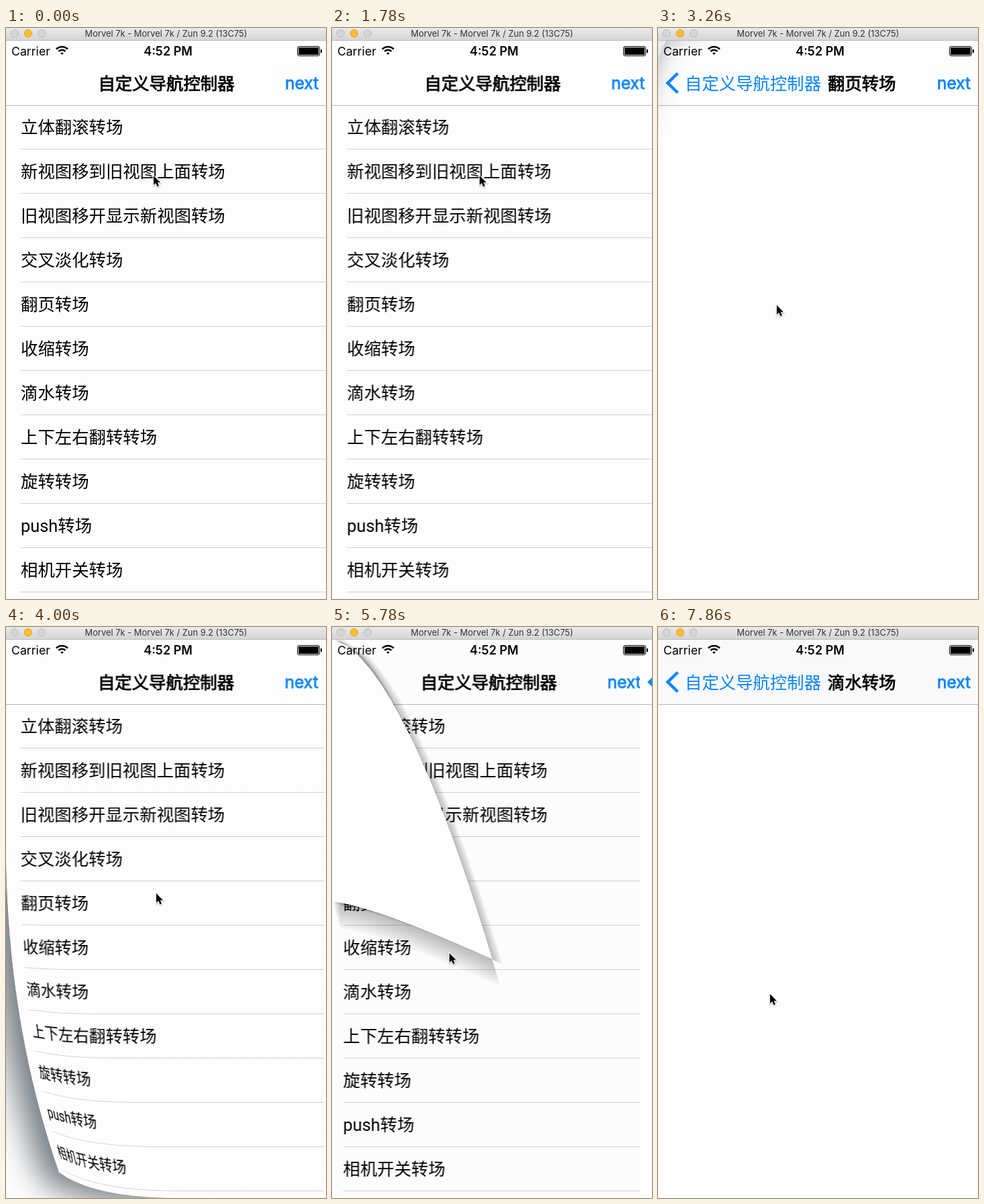
An HTML page with a canvas for the animation above (8 s loop, 477 by 851 pixels).

```html
<!DOCTYPE html>
<html lang="zh-CN">
<head>
<meta charset="utf-8">
<style>
  html, body { margin: 0; width: 100%; height: 100%; overflow: hidden; background: #fdfdfd; }
  canvas { display: block; }
</style>
</head>
<body>
<canvas id="stage" width="477" height="851"></canvas>
<script>
const W = 477, H = 851, TOP = 19;
const LOOP = 8000, TICK = LOOP / 54, DURATION = 700;
const BLUE = '#0a84ff';
const CJK = '"Noto Sans CJK SC", "Noto Sans CJK", sans-serif';
const UI = 'Inter, ' + CJK, ROW_FONT = '25.4px Roboto, ' + CJK;
const HOME = '自定义导航控制器';
const ROWS = ['立体翻滚转场', '新视图移到旧视图上面转场', '旧视图移开显示新视图转场', '交叉淡化转场',
  '翻页转场', '收缩转场', '滴水转场', '上下左右翻转转场', '旋转转场', 'push转场', '相机开关转场'];

const stage = document.getElementById('stage').getContext('2d');
const clamp = (v, lo = 0, hi = 1) => Math.min(hi, Math.max(lo, v));
const lerp = (a, b, k) => a + (b - a) * k;

function layer() {
  const c = document.createElement('canvas');
  c.width = W;
  c.height = H;
  return c.getContext('2d');
}

// CSS "ease" curve
function ease(x) {
  let lo = 0, hi = 1;
  for (let i = 0; i < 24; i++) {
    const s = (lo + hi) / 2;
    if (0.75 * s * (1 - s) + s ** 3 < x) lo = s; else hi = s;
  }
  return 0.3 * lo * (1 - lo) ** 2 + 3 * lo * lo * (1 - lo) + lo ** 3;
}

function text(g, str, x, y, font, color = '#000', align = 'left') {
  g.font = font;
  g.fillStyle = color;
  g.textAlign = align;
  g.fillText(str, x, y);
}

// Medium weight: regular glyphs with a hairline outline
function mediumText(g, str, x, y, font, color, align) {
  text(g, str, x, y, font, color, align);
  g.strokeStyle = g.fillStyle;
  g.lineWidth = 0.8;
  g.strokeText(str, x, y);
}

function rect(g, x, y, w, h, color) {
  g.fillStyle = color;
  g.fillRect(x, y, w, h);
}

function trace(g, points) {
  g.beginPath();
  points.forEach(p => g.lineTo(p[0], p[1]));
}

// ---- Screens ----
function blankScreen(barColor) {
  const g = layer();
  rect(g, 0, TOP, W, H - TOP, '#fdfdfd');
  rect(g, 0, TOP, W, 96, barColor);
  rect(g, 0, 115, W, 1, '#b8b8ba');
  mediumText(g, 'next', 466, 91, '24.5px ' + UI, BLUE, 'right');
  return g;
}

function drawList(selected) {
  const g = blankScreen('#fdfdfd');
  mediumText(g, HOME, 239, 92, '25.4px ' + UI, '#000', 'center');
  ROWS.forEach((label, i) => {
    const bottom = 180 + 66 * i;
    if (i === selected) rect(g, 0, bottom - 66, W, 67, '#dadada');
    else rect(g, 22, bottom, W - 22, 1, '#d0d0d2');
    text(g, label, 22, bottom - 23, ROW_FONT);
  });
  return g.canvas;
}

function drawDetail(row) {
  const long = row === 1;
  const g = blankScreen(row === 6 ? '#f9f9f9' : '#fdfdfd');
  trace(g, [[29.5, 67.5], [14.5, 82], [29.5, 96.5]]);
  g.strokeStyle = BLUE;
  g.lineWidth = 4.5;
  g.stroke();
  text(g, long ? 'Ba...' : HOME, 40, long ? 91 : 92, '25.4px ' + UI, BLUE);
  mediumText(g, ROWS[row], long ? 99 : 253, 92, '25.4px ' + UI);
  return g.canvas;
}

const cache = {};
const list = row => cache['list' + row] ??= drawList(row);
const detail = row => cache['detail' + row] ??= drawDetail(row);

// Built-in slide between list and detail, running beneath every effect
const slide = layer(), blend = layer();
function slideScreen(row, elapsed, pushing) {
  const wt = 0.027 * Math.max(0, elapsed - 30);
  const q = 1 - (1 + wt) * Math.exp(-wt);
  const x = W * (pushing ? 1 - q : q);
  slide.clearRect(0, 0, W, H);
  rect(slide, 0, TOP, W, H - TOP, '#fdfdfd');
  slide.drawImage(list(-1), -0.3 * (W - x), 0);
  rect(slide, 0, TOP, W, H - TOP, `rgba(0,0,0,${0.1 * (1 - x / W)})`);
  slide.drawImage(detail(row), x, 0);
  return slide.canvas;
}

// ---- Mesh warping ----
function triangle(img, points, anchor, source, ax, ay) {
  const cx = (points[0][0] + points[1][0] + points[2][0]) / 3;
  const cy = (points[0][1] + points[1][1] + points[2][1]) / 3;
  const grown = points.map(([x, y]) => {
    const r = Math.hypot(x - cx, y - cy) || 1;
    return [x + (x - cx) / r * 0.8, y + (y - cy) / r * 0.8];
  });
  stage.save();
  trace(stage, grown);
  const facing = ax[0] * ay[1] - ax[1] * ay[0];
  if (facing < 0) {
    stage.fillStyle = '#e6e9eb';
    stage.fill();
  } else {
    stage.clip();
    stage.transform(ax[0], ax[1], ay[0], ay[1],
      anchor[0] - ax[0] * source[0] - ay[0] * source[1],
      anchor[1] - ax[1] * source[0] - ay[1] * source[1]);
    stage.drawImage(img, 0, 0);
  }
  stage.restore();
}

// map(u, v) returns [x, y, depth]
function warp(img, map) {
  const cols = 18, rows = 32, w = W / cols, h = (H - TOP) / rows;
  const cells = [];
  for (let j = 0; j < rows; j++) for (let i = 0; i < cols; i++) {
    const u = i * w, v = TOP + j * h;
    const [a, b, c, d] = [map(u, v), map(u + w, v), map(u, v + h), map(u + w, v + h)];
    cells.push({ u, v, a, b, c, d, depth: a[2] + d[2] });
  }
  cells.sort((p, q) => p.depth - q.depth);
  const step = (from, to, size) => [(to[0] - from[0]) / size, (to[1] - from[1]) / size];
  for (const { u, v, a, b, c, d } of cells) {
    triangle(img, [a, b, c], a, [u, v], step(a, b, w), step(a, c, h));
    triangle(img, [b, d, c], d, [u + w, v + h], step(c, d, w), step(b, d, h));
  }
}

function outline(map) {
  const points = [], n = 30;
  for (let i = 0; i < n; i++) points.push(map(W * i / n, TOP));
  for (let i = 0; i < n; i++) points.push(map(W, lerp(TOP, H, i / n)));
  for (let i = 0; i < n; i++) points.push(map(W * (1 - i / n), H));
  for (let i = 0; i < n; i++) points.push(map(0, lerp(H, TOP, i / n)));
  return points;
}

// ---- Effects ----
function moveIn(from, to, p) {
  stage.drawImage(from, 0, 0);
  stage.globalAlpha = clamp(1.8 * p);
  stage.drawImage(to, W * (1 - p), 0);
  stage.globalAlpha = 1;
}

function curl(from, to, p, pushing) {
  const [page, under, lift] = pushing ? [from, to, p] : [to, from, 1 - p];
  const side = pushing ? 1 : -1, nx = 0.9 * side, ny = 0.44, R = 156;
  const fold = Math.max(0, nx * W) + ny * H - 960 * lift;
  const map = (u, v) => {
    const d = nx * u + ny * v - fold;
    const bent = d < 0 ? d : d < 4 * R ? d - d * d / (4 * R) : 4 * R - d;
    return [u + nx * (bent - d), v + ny * (bent - d), Math.max(0, d)];
  };
  stage.drawImage(under, 0, 0);
  if (lift >= 0.999) return;
  stage.save();
  stage.shadowColor = 'rgba(75,85,94,.75)';
  stage.shadowBlur = 46;
  stage.shadowOffsetX = 26 * side;
  stage.shadowOffsetY = 10;
  trace(stage, outline(map));
  stage.fillStyle = '#e6e9eb';
  stage.fill();
  stage.restore();
  warp(page, map);
}

function suck(from, to, p) {
  const tall = H - TOP;
  const map = (u, v) => {
    const s = u / W;
    const lag = 86 * 4 * p * (1 - p) * s ** 1.6 * (1 + 0.0024 * (H - v));
    const y = Math.max(TOP, v + 2.2 * Math.max(0, v - 840) * p - 850 * p + lag);
    const funnel = 0.7 * ((y - TOP) / tall) ** 0.6 * s ** 1.12;
    return [W * lerp(s, funnel, clamp(2 * p)), y, 0];
  };
  stage.drawImage(to, 0, 0);
  const edge = outline(map);
  stage.fillStyle = 'rgba(0,0,0,.035)';
  for (let k = 8; k > 0; k--) {
    for (const [dx, dy] of [[2, 1], [1.5, 5]]) {
      trace(stage, edge.map(([x, y]) => [x + dx * k, y + dy * k * clamp((y - TOP) / 200)]));
      stage.fill();
    }
  }
  trace(stage, edge);
  stage.fillStyle = '#fdfdfd';
  stage.fill();
  warp(from, map);
}

function ripple(from, to, p) {
  blend.clearRect(0, 0, W, H);
  blend.drawImage(from, 0, 0);
  blend.globalAlpha = clamp(p * 1.2);
  blend.drawImage(to, 0, 0);
  blend.globalAlpha = 1;
  stage.drawImage(blend.canvas, 0, 0);
  const amp = 14 * (1 - p) * clamp(4 * p);
  warp(blend.canvas, (u, v) => {
    const dx = u - W / 2, dy = v - H / 2, r = Math.hypot(dx, dy) || 1;
    const shift = r < 900 * p ? amp * Math.sin(r / 22 - 20 * p) : 0;
    return [u + dx / r * shift, v + dy / r * shift, 0];
  });
}

const SCENES = [
  { row: 1, effect: moveIn, push: 165, pop: 1100 },
  { row: 4, effect: curl, push: 2690, pop: 3680 },
  { row: 5, effect: suck, push: 4770, pop: 5560 },
  { row: 6, effect: ripple, push: 7000, pop: Infinity }
];

function drawContent(t) {
  const scene = SCENES.findLast(s => t >= s.push - 50);
  if (!scene) return stage.drawImage(list(-1), 0, 0);
  const { row, effect, push, pop } = scene;
  const pushing = t < pop, elapsed = t - (pushing ? push : pop);
  if (elapsed < 0) return stage.drawImage(list(row), 0, 0);
  if (elapsed >= DURATION) return stage.drawImage(pushing ? detail(row) : list(-1), 0, 0);
  const from = pushing ? list(row) : detail(row);
  effect(from, slideScreen(row, elapsed, pushing), ease(elapsed / DURATION), pushing);
}

// ---- Fixed chrome and pointer ----
function drawChrome() {
  const g = stage;
  const bar = g.createLinearGradient(0, 0, 0, TOP);
  bar.addColorStop(0, '#eaeaea');
  bar.addColorStop(1, '#d3d3d3');
  rect(g, 0, 0, W, TOP, bar);
  rect(g, 0, 18, W, 1, '#bcbcbc');
  ['#d5d5d5', '#fdbe2f', '#d5d5d5'].forEach((color, i) => {
    g.beginPath();
    g.arc(13 + 20 * i, 8, 5.6, 0, 7);
    g.fillStyle = color;
    g.fill();
    g.lineWidth = 1;
    g.strokeStyle = i === 1 ? '#dfa023' : '#bdbdbd';
    g.stroke();
  });
  text(g, 'Morvel 7k - Morvel 7k / Zun 9.2 (13C75)', 238.5, 13, '12.9px ' + UI, '#333', 'center');

  text(g, 'Carrier', 8, 41, '17.7px ' + UI);
  text(g, '4:52 PM', 241.5, 41, '600 18px ' + UI, '#000', 'center');
  g.strokeStyle = '#000';
  g.lineWidth = 2.6;
  for (const r of [2, 7.2, 12]) {
    g.beginPath();
    g.arc(83.5, 40, r, -Math.PI * 0.75, -Math.PI * 0.25);
    g.stroke();
  }
  g.lineWidth = 1;
  g.beginPath();
  g.roundRect(434.5, 27.5, 33, 14, 2.5);
  g.stroke();
  rect(g, 436, 29, 30, 11, '#000');
  rect(g, 469, 32, 2, 5, '#000');
}

const POINTER = [[0, 220, 220], [1780, 220, 220], [2220, 202, 377], [2370, 177, 413], [3400, 177, 413],
  [3650, 224, 397], [4150, 224, 397], [4440, 175, 486], [6230, 175, 486], [6520, 167, 528],
  [6660, 167, 547], [LOOP, 167, 547]];

function drawPointer(t) {
  const i = Math.max(1, POINTER.findIndex(p => p[0] > t));
  const [a, b] = [POINTER[i - 1], POINTER[i]];
  const k = clamp((t - a[0]) / (b[0] - a[0]));
  stage.save();
  stage.translate(lerp(a[1], b[1], k), lerp(a[2], b[2], k));
  trace(stage, [[0, 0], [0, 14], [3.2, 11], [5.5, 16.2], [8, 15.2], [5.8, 10.2], [10, 10.2]]);
  stage.closePath();
  stage.shadowColor = 'rgba(0,0,0,.35)';
  stage.shadowBlur = 2;
  stage.shadowOffsetY = 1;
  stage.lineWidth = 2;
  stage.strokeStyle = '#fff';
  stage.stroke();
  stage.shadowColor = 'transparent';
  stage.fillStyle = '#000';
  stage.fill();
  stage.restore();
}

let shown = -1;
const began = performance.now();
function frame() {
  const t = (performance.now() - began) % LOOP;
  const tick = Math.min(53, Math.floor((t + 9) / TICK));
  if (tick !== shown) {
    shown = tick;
    const time = tick * TICK;
    rect(stage, 0, 0, W, H, '#fdfdfd');
    drawContent(time);
    drawChrome();
    drawPointer(time);
  }
  requestAnimationFrame(frame);
}
frame();
</script>
</body>
</html>
```
